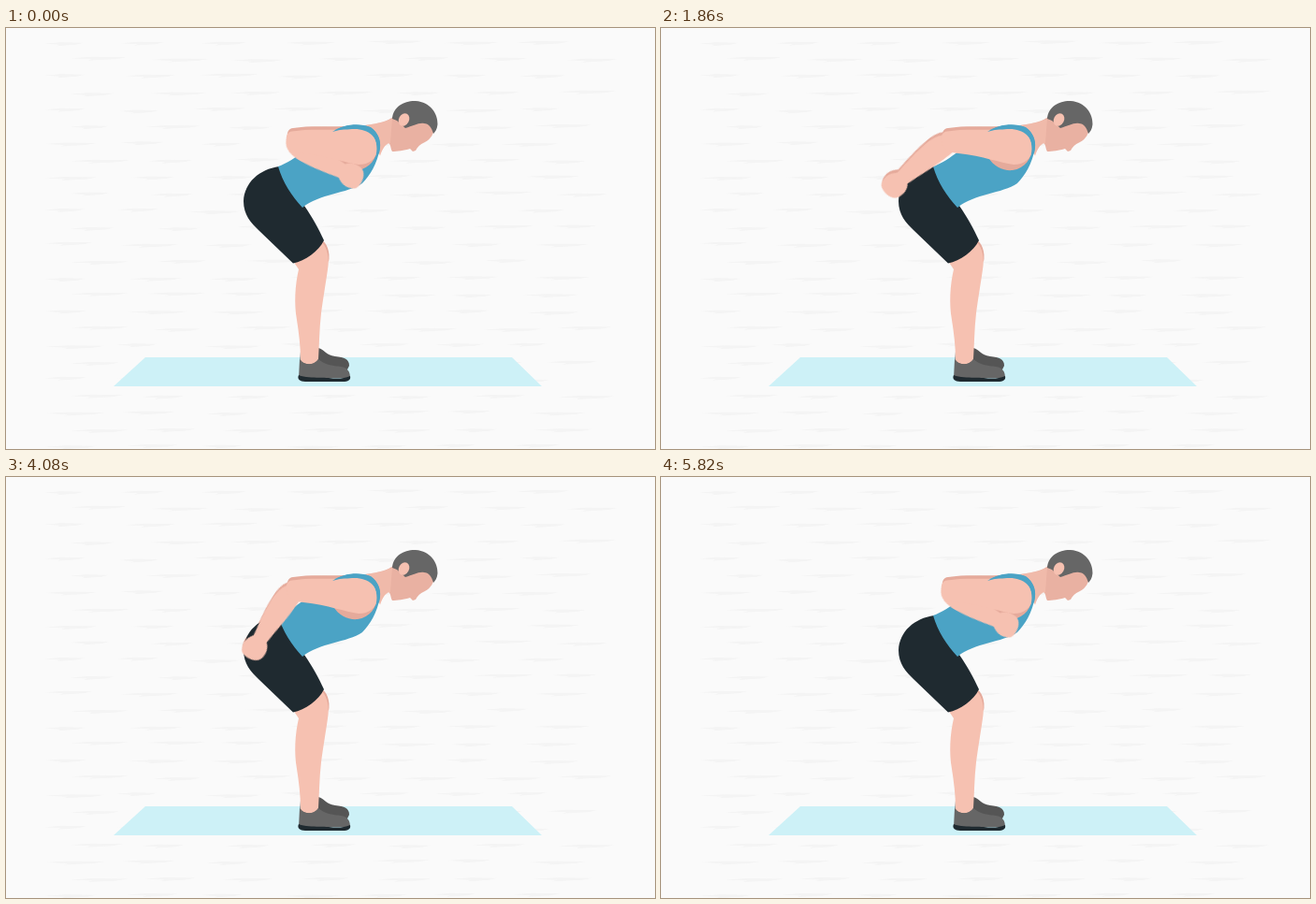
These frames come from a looping animation (694 px wide and 450 px high, 5.85 s). An HTML page:

```html
<!DOCTYPE html>
<html lang="en">
<head>
<meta charset="utf-8">
<title>Triceps kickback</title>
<style>
  html, body { margin: 0; width: 100%; height: 100%; overflow: hidden; background: #fafafa; }
  svg { display: block; width: 100vw; height: 100vh; }
  .skin { fill: #f6c1b1; }
  .shade { fill: #e5aa9b; }
  .face { fill: #e9b1a2; }
  .top { fill: #4ba3c5; }
  .dark { fill: #1f2a30; }
  .forearm { animation: kick 5850ms infinite; }
  @keyframes kick {
    0% { transform: rotate(30deg); animation-timing-function: cubic-bezier(.33, .13, .67, .87); }
    48.7% { transform: rotate(190deg); animation-timing-function: cubic-bezier(.33, .1, .67, .9); }
    97.1%, 100% { transform: rotate(30deg); }
  }
</style>
</head>
<body>
<svg viewBox="0 0 694 450">
  <defs>
    <path id="upper" d="M306 110.500C325 107 350 110 370 108C388 107 397 117 397 128C397 140 388 146 377 146C362 144 345 137 318 134C308 133 300 129 300 121C299 115 301 111 306 110.500Z"/>
    <path id="lower" d="M0 -12C20 -13 45 -9 61 -8C64 -13 74 -15 80 -12C86 -8 87 2 84 8C80 13 70 14 62 8C48 10 32 13 18 13C8 13 -4 11 -7 0C-7 -8 -3 -12 0 -12Z"/>
  </defs>

  <path id="wall" fill="#f4f4f4"/>
  <path fill="#cdf1f7" d="M149 352H541L573 383H115Z"/>

  <!-- far arm -->
  <g class="shade" transform="translate(1 -3.500)">
    <use href="#upper"/>
    <g transform="translate(306 122)"><use href="#lower" class="forearm"/></g>
  </g>

  <!-- legs and shoes -->
  <path fill="#555" d="M315 346L334 342C340 343 342 350 352 351C362 352 367 354 367 361L365 365L314 360Z"/>
  <path class="shade" d="M336 226C343 228 347 240 345 250L335 240Z"/>
  <path class="skin" d="M307 249L338 229C344 236 346 246 344 258C342 272 339 290 337 305C335 322 335 338 334 354C331 361 319 361 315 355C315 340 313 325 311 312C308 295 309 275 313 258Z"/>
  <path fill="#666" d="M314 354C318 361 329 361 334 354C341 360 349 361 358 362C366 363 368 368 368 374L313 374Z"/>
  <path class="dark" d="M313 371C323 375 336 373 345 374C354 375 361 375 368 372C369 376 366 378 360 378H320C314 378 311 375 313 371Z"/>

  <!-- body -->
  <path class="dark" d="M292 148C271 151 255 165 254 185C254 200 262 208 270 216L307 251.500C320 249 334 239 340 227C334 214 328 203 319 190Z"/>
  <path class="face" d="M384 104C398 102 409 100 415 94L430 88L459 103C458 113 454 119 448 122C443 124 440 127 438 131L435 132L432 129C426 131 418 132 413 132C411 129 412 125 409 123C404 126 402 131 400 136Z"/>
  <path class="skin" d="M384 104C396 102 404 101 413 97L411 123C405 124 402 130 400 137Z" opacity=".55"/>
  <path fill="#666" d="M413 97C414 84 426 77.500 438 78C454 79 462 92 461.500 103C461 108 459 111 457 113C455 106 452 102 447 102C441 101 435 105 427 107L418 99Z"/>
  <ellipse class="skin" cx="425.500" cy="98" rx="5.500" ry="7" transform="rotate(28 425.500 98)"/>
  <path class="top" d="M291 148C300 145 310 138 318 132L350 110C362 103 378 102 390 106C398 112 401 120 400 128C397 145 389 158 381 166C365 177 335 177 317 192C305 179 296 165 291 148Z"/>
  <path class="shade" d="M350 138C356 149 367 153 376 152C389 150 397 140 397 126L376 112Z"/>

  <!-- near arm -->
  <g class="skin">
    <g transform="translate(306 122)"><use href="#lower" class="forearm"/></g>
    <use href="#upper"/>
  </g>
  <path class="top" d="M349 111C360 103 378 101 389 106C398 111 402 122 399 134L396 136C398 122 394 113 386 109C376 105 364 107 349 111Z"/>
</svg>
<script>
  // Faint brush marks on the wall, in staggered rows
  let seed = 7;
  const rand = () => (seed = seed * 16807 % 2147483647) / 2147483647;
  let d = '';
  for (let row = 0; row < 25; row++) {
    const y = 14 + row * 18;
    for (let x = row % 2 ? 68 : 41; x < 600; x += 76 + rand() * 18) {
      const w = 42 + rand() * 24, t = y + rand() * 3;
      d += `M${x} ${t}l${w * .4} -1.500l${w * .6} .500l-${w * .2} 2l-${w * .5} 1.500l${w * .1} -1.500z`;
    }
  }
  document.getElementById('wall').setAttribute('d', d);
</script>
</body>
</html>
```
